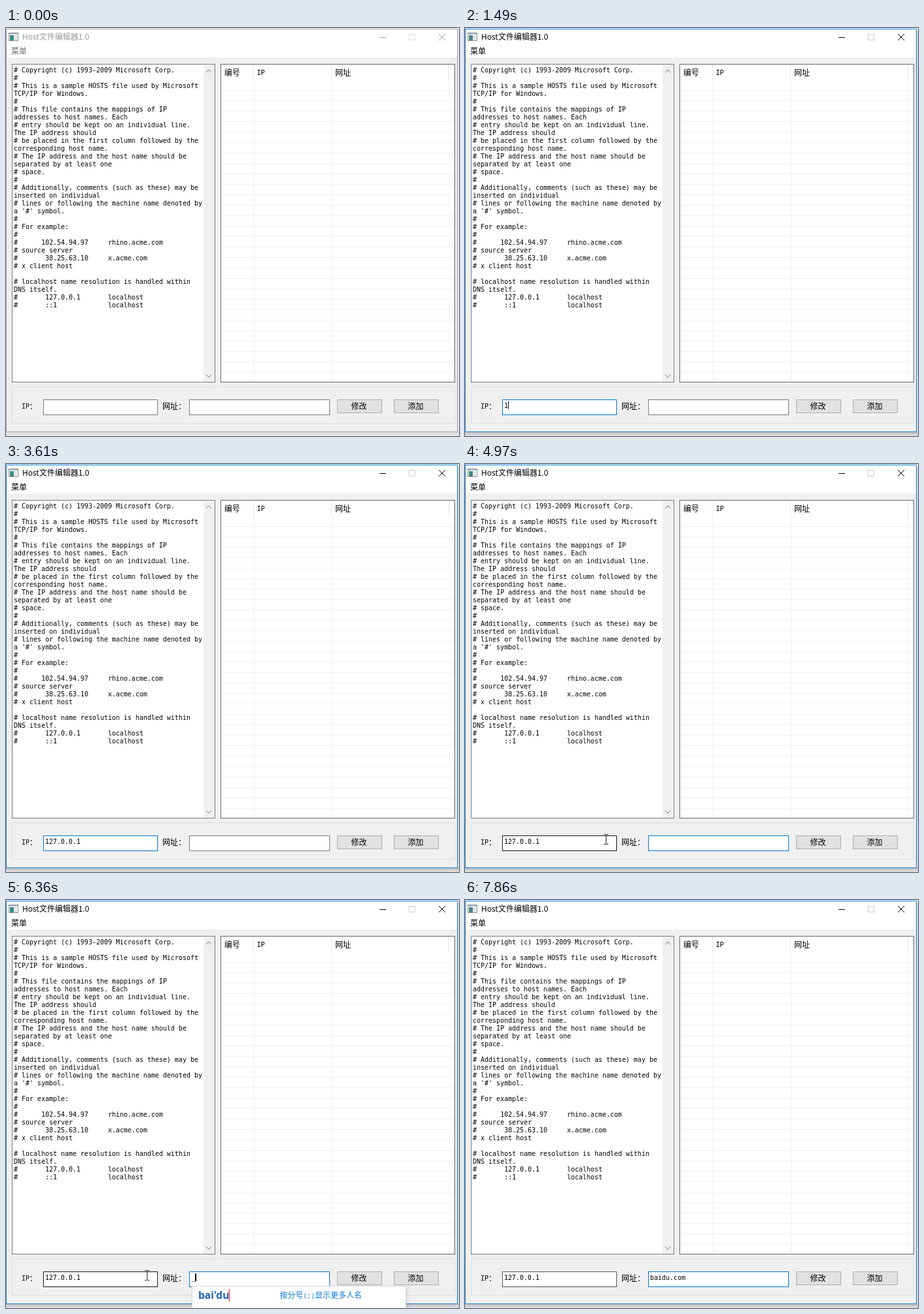
Animation, 695 px wide and 625 px high, one loop 8000 ms. Source, as an HTML page:

```html
<!DOCTYPE html>
<html lang="zh-CN">
<head>
<meta charset="utf-8">
<title>Host文件编辑器</title>
<style>
html, body { margin: 0; width: 100%; height: 100%; overflow: hidden; background: #fff; }
svg { display: block; width: 695px; height: 625px; }
text { white-space: pre; font: 12px "Noto Sans CJK SC", "Noto Sans CJK", sans-serif; }
.mono { font: 10px "DejaVu Sans Mono", monospace; }
rect, line, .crisp { shape-rendering: crispEdges; }
.panel { fill: #fff; stroke: #646464; }
.field { fill: #fff; stroke: #7a7a7a; }
.button { fill: #e1e1e1; stroke: #adadad; }
.chevron { fill: none; stroke: #a8a8a8; stroke-width: 1.3; }
#frame { fill: #f0f0f0; stroke: #aaa; }
#chrome { fill: #999; stroke: #999; }
#chrome text { stroke: none; }
#menu { fill: #6d6d6d; }
#maximize { fill: none; stroke: #e2e2e2; }
#shade { opacity: .6; }
.active #frame { stroke: #1883d7; }
.active #chrome { fill: #000; stroke: #000; }
.active #menu { fill: #000; }
.active #maximize { stroke: #ccc; }
.active #shade { opacity: 1; }
.pinyin { font: bold 15.6px "Open Sans", sans-serif; fill: #1f62bd; }
.hint { fill: #0f78d8; }
</style>
</head>
<body>
<svg id="stage" viewBox="0 0 695 625">
  <defs>
    <linearGradient id="fall" x2="0" y2="1">
      <stop stop-color="#bcbcbc"/><stop offset="1" stop-color="#e2e2e2"/>
    </linearGradient>
    <filter id="soft" x="-10%" y="-50%" width="120%" height="200%">
      <feDropShadow dx="3" dy="3" stdDeviation="3" flood-opacity=".08"/>
    </filter>
  </defs>

  <g id="shade">
    <rect y="619" width="695" height="6" fill="url(#fall)"/>
    <rect x="693" y="4" width="2" height="615" fill="#d4d4d4"/>
  </g>
  <rect id="frame" x=".5" y="1.5" width="692" height="617"/>
  <rect x="1" y="2" width="691" height="43" fill="#fff"/>

  <g class="crisp">
    <rect x="4.5" y="7.5" width="14" height="12" fill="#fff" stroke="#8a9298"/>
    <rect x="5" y="8" width="13" height="2" fill="#b4bcc2"/>
    <rect x="6" y="11" width="6" height="8" fill="#3f8a84"/>
    <rect x="13" y="11" width="4" height="8" fill="#dfe3e5"/>
  </g>
  <g id="chrome">
    <text x="25" y="18">Host文件编辑器1.0</text>
    <path class="crisp" d="M573 14.5h10"/>
    <path d="M664 9l10 10m0-10l-10 10" fill="none"/>
  </g>
  <rect id="maximize" x="618.5" y="9.5" width="9" height="9"/>
  <text id="menu" x="8" y="40">菜单</text>

  <rect class="field" x="9.5" y="55.5" width="311" height="487"/>
  <rect x="303" y="56" width="17" height="486" fill="#f0f0f0"/>
  <path class="chevron" d="M307 68l4-4 4 4M307 531l4 4 4-4"/>
  <g id="hosts"></g>

  <rect class="panel" x="329.5" y="55.5" width="359" height="487"/>
  <g id="grid" stroke="#f0f0f0"></g>
  <path class="crisp" d="M379.5 56v24M499.5 56v24M679.5 56v24" stroke="#e5e5e5"/>
  <text x="335" y="73">编号</text>
  <text x="385" y="72" class="mono">IP</text>
  <text x="505" y="73">网址</text>

  <rect x="9.5" y="549.5" width="679" height="56" fill="none" stroke="#dcdcdc"/>
  <text x="24" y="583" class="mono">IP</text>
  <text x="36" y="584">：</text>
  <text x="240" y="584">网址：</text>
  <rect id="ipBox" class="field" x="57.5" y="569.5" width="175" height="23"/>
  <rect id="urlBox" class="field" x="281.5" y="569.5" width="215" height="23"/>
  <text id="ipText" class="mono" x="60" y="582"></text>
  <text id="urlText" class="mono" x="284" y="582"></text>
  <rect class="button" x="508.5" y="569.5" width="68" height="20"/>
  <rect class="button" x="595.5" y="569.5" width="68" height="20"/>
  <g text-anchor="middle">
    <text x="541.5" y="584">修改</text>
    <text x="628.5" y="584">添加</text>
  </g>

  <rect id="caret" y="572" height="12"/>
  <path id="compose" class="crisp" d="M285 584.5h5" stroke="#000" stroke-dasharray="1 1"/>
  <path id="beam" class="crisp" d="M-3 -7.5h3m1 0h3M.5 -7v14M-3 7.5h3m1 0h3" fill="none" stroke="#222"/>

  <g id="popup">
    <rect id="popupBox" x="285.5" y="591.5" height="60" fill="#fff" stroke="#cfdae6" filter="url(#soft)"/>
    <text id="pinyin" class="pinyin" x="295" y="611"></text>
    <rect id="popupCaret" y="596" width="1" height="19" fill="#f00"/>
    <text id="hint" class="hint" x="420" y="610">按分号<tspan class="mono">(;)</tspan>显示更多人名</text>
  </g>
</svg>

<script>
const LOOP = 8000, CHAR = 6;
const $ = id => document.getElementById(id);
const NS = "http://www.w3.org/2000/svg";

function add(parent, tag, attrs, content = "") {
  const node = document.createElementNS(NS, tag);
  for (const key in attrs) node.setAttribute(key, attrs[key]);
  node.textContent = content;
  parent.append(node);
}

const hosts = `# Copyright (c) 1993-2009 Microsoft Corp.
#
# This is a sample HOSTS file used by Microsoft
TCP/IP for Windows.
#
# This file contains the mappings of IP
addresses to host names. Each
# entry should be kept on an individual line.
The IP address should
# be placed in the first column followed by the
corresponding host name.
# The IP address and the host name should be
separated by at least one
# space.
#
# Additionally, comments (such as these) may be
inserted on individual
# lines or following the machine name denoted by
a '#' symbol.
#
# For example:
#
#      102.54.94.97     rhino.acme.com
# source server
#       38.25.63.10     x.acme.com
# x client host

# localhost name resolution is handled within
DNS itself.
#       127.0.0.1       localhost
#       ::1             localhost`;
hosts.split("\n").forEach((line, i) =>
  add($("hosts"), "text", { class: "mono", x: 12, y: 68 + 12 * i }, line));

for (let y = 95.5; y < 540; y += 16) add($("grid"), "line", { x1: 330, x2: 688, y1: y, y2: y });
for (const x of [380.5, 500.5, 680.5]) add($("grid"), "line", { x1: x, x2: x, y1: 80, y2: 542 });

const GREY = "#7a7a7a", HOVER = "#171717", BLUE = "#0078d7";
const idle = {
  active: false, ip: "", url: "", ipEdge: GREY, urlEdge: GREY,
  focus: "", caret: false, beam: null, pinyin: "", hint: false, popupWidth: 328
};

// Each step keeps the previous state and changes only what it names.
const steps = [
  [0, {}],
  [270, { beam: [470, 584], urlEdge: "#555" }],
  [420, { beam: [330, 579], urlEdge: HOVER }],
  [570, { beam: [220, 575], ipEdge: HOVER, urlEdge: "#444" }],
  [720, { beam: [216, 575], urlEdge: GREY }],
  [870, { active: true, focus: "ip", caret: true, ipEdge: "#0b4c82" }],
  [1030, { ipEdge: BLUE }],
  [1490, { ip: "1", beam: null }],
  [1640, { ip: "12" }],
  [1790, { ip: "127" }],
  [2080, { ip: "127." }],
  [2230, { ip: "127.0" }],
  [2390, { ip: "127.0." }],
  [2540, { ip: "127.0.0" }],
  [2690, { ip: "127.0.0." }],
  [3000, { ip: "127.0.0.1" }],
  [3610, { caret: false }],
  [4060, { caret: true }],
  [4210, { focus: "url", beam: [216, 575], ipEdge: "#0b4c82", urlEdge: "#3d79a9" }],
  [4360, { ipEdge: "#13304a", urlEdge: BLUE }],
  [4510, { ipEdge: HOVER }],
  [4970, { caret: false }],
  [5430, { caret: true }],
  [5580, { pinyin: "b" }],
  [5740, { pinyin: "ba" }],
  [5890, { pinyin: "bai" }],
  [6050, { pinyin: "bai'd" }],
  [6360, { pinyin: "bai'du", hint: true }],
  [6500, { hint: false, popupWidth: 148 }],
  [6960, { pinyin: "", url: "baidu" }],
  [7580, { url: "baidu.c", beam: null, ipEdge: "#252525" }],
  [7720, { url: "baidu.com", ipEdge: "#3c3c3c" }],
  [7860, { caret: false, ipEdge: "#555" }]
];
let last = idle;
const states = steps.map(([time, change]) => [time, last = { ...last, ...change }]);

const show = (id, on) => $(id).setAttribute("visibility", on ? "visible" : "hidden");

function draw(s) {
  const composing = s.pinyin !== "";
  $("stage").classList.toggle("active", s.active);
  $("ipBox").style.stroke = s.ipEdge;
  $("urlBox").style.stroke = s.urlEdge;
  $("ipText").textContent = s.ip;
  $("urlText").textContent = s.url;

  const origin = s.focus === "ip" ? 60 : 284;
  const typed = s.focus === "ip" ? s.ip : s.url;
  $("caret").setAttribute("x", origin + (composing ? CHAR : typed.length * CHAR));
  $("caret").setAttribute("width", composing ? 2 : 1);
  show("caret", s.caret);
  show("compose", composing);

  show("beam", s.beam);
  if (s.beam) $("beam").setAttribute("transform", `translate(${s.beam})`);

  $("popup").style.display = composing ? "" : "none";
  if (composing) {
    $("pinyin").textContent = s.pinyin;
    $("popupBox").setAttribute("width", s.popupWidth);
    $("popupCaret").setAttribute("x", Math.round(295 + $("pinyin").getComputedTextLength()));
    show("hint", s.hint);
  }
}

const start = performance.now();
let shown;
function tick() {
  const time = (performance.now() - start) % LOOP;
  const state = states.findLast(([from]) => from <= time)[1];
  if (state !== shown) draw(shown = state);
  requestAnimationFrame(tick);
}
tick();
</script>
</body>
</html>
```
